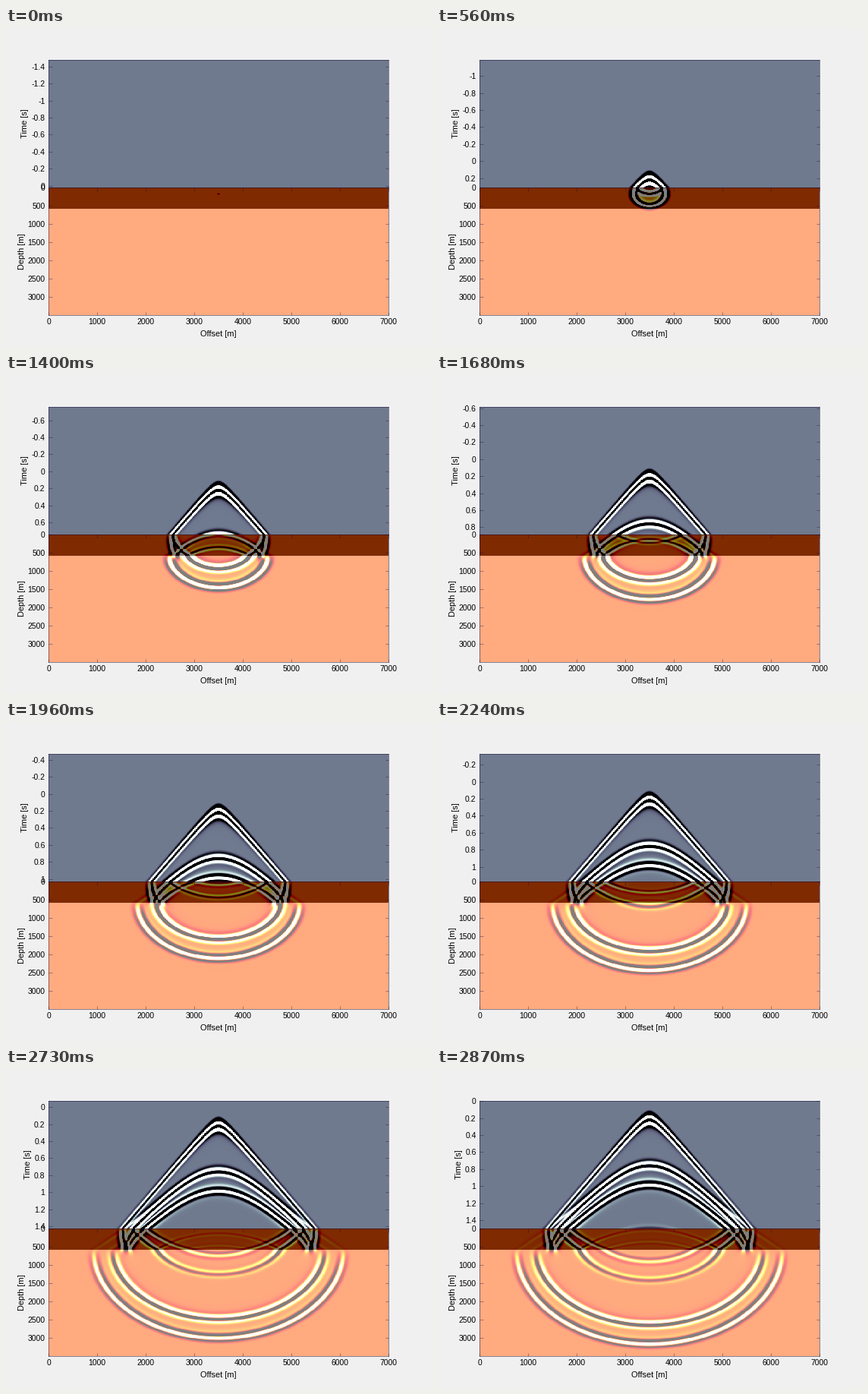
Animation, 560 px wide and 420 px high, one loop 2.94 s. Source, as a matplotlib script:

```python
import numpy as np
import matplotlib.pyplot as plt
from matplotlib.animation import FuncAnimation

plt.rcParams["font.family"] = "Liberation Sans"

# Acoustic model: a slow layer over a faster half space, free surface on top
H, DT = 10.0, 0.002
NX, NZ, NT = 700, 350, 750
FRAMES, FIRST, STRIDE = 42, 11, 18
SRC_Z, REC_Z, LAYER = 17, 2, 58
FREQ, DELAY = 10.0, 0.1
PX = 0.72  # one pixel in points


def source(t):
    """Time derivative of a Ricker wavelet."""
    a = (np.pi * FREQ) ** 2
    s = t - DELAY
    return (4 * a * a * s ** 3 - 6 * a * s) * np.exp(-a * s * s)


def simulate():
    speed = np.full((NZ, 1), 1500.0)
    speed[LAYER:] = 2270.0
    k = ((speed * DT / H) ** 2 / 12).astype(np.float32)
    # Two ghost cells on every side; row 2 is the surface
    p = np.zeros((NZ + 4, NX + 5), np.float32)
    old = np.zeros_like(p)
    mid = NX // 2 + 2
    snaps, trace = [], np.zeros((NT, NX + 1), np.float32)
    for n in range(NT):
        c = p[2:-2, 2:-2]
        lap = 16 * (p[1:-3, 2:-2] + p[3:-1, 2:-2] + p[2:-2, 1:-3] + p[2:-2, 3:-1])
        lap -= p[:-4, 2:-2] + p[4:, 2:-2] + p[2:-2, :-4] + p[2:-2, 4:]
        lap -= 60 * c
        old[2:-2, 2:-2] = 2 * c - old[2:-2, 2:-2] + k * lap
        p, old = old, p
        p[2 + SRC_Z, mid] += source(n * DT) * DT
        p[2] = 0
        p[1], p[0] = -p[3], -p[4]
        trace[n] = p[2 + REC_Z, 2:-2]
        if n % STRIDE == FIRST:
            snaps.append(p[2:-2, 2:-2].copy())
    return snaps, trace


def hot(v):
    return np.stack([np.clip(v / 0.375, 0, 1),
                     np.clip((v - 0.375) / 0.375, 0, 1),
                     np.clip((v - 0.75) / 0.25, 0, 1)], axis=-1)


def bone(v):
    return (7 * v[..., None] + hot(v)[..., ::-1]) / 8


def level(a, clip):
    return np.clip(0.5 + 0.5 * a / clip, 0, 1)


snaps, trace = simulate()
wave_clip = 0.3 * np.abs(snaps[32][100:]).max()
trace_clip = 0.2 * np.abs(trace[330:430, NX // 2]).max()

rock = np.zeros((NZ, 1, 1))
rock[LAYER:] = 1


def section(i):
    return 0.5 * rock + 0.5 * hot(level(snaps[i], wave_clip))


gather = bone(level(np.vstack([np.zeros_like(trace), trace]), trace_clip))

fig = plt.figure(figsize=(5.6, 4.2), dpi=100, facecolor="#f0f0f0")
top = fig.add_axes([0.1, 0.5, 0.8, 0.4])
low = fig.add_axes([0.1, 0.1, 0.8, 0.4])
INK = (0.08, 0.04, 0.2, 0.6)
for ax in (top, low):
    ax.tick_params(direction="in", length=4.5 * PX, width=0.6 * PX, color=INK,
                   right=True, labelsize=10.4 * PX, pad=4.5 * PX)
    for s in ax.spines.values():
        s.set(color=INK, linewidth=0.8 * PX)
top.set_xticks([])
low.tick_params(top=True)

top.imshow(gather, extent=(0, 7000, NT * DT, -NT * DT), aspect="auto",
           interpolation="nearest")
view = low.imshow(section(0), extent=(0, 7000, 3500, 0), aspect="auto",
                  interpolation="nearest")
low.set_xticks(range(0, 7001, 1000))
low.set_yticks(range(0, 3001, 500))


def label(x, y, text, turn=0):
    return fig.text(x / 560, 1 - y / 420, text, fontsize=11 * PX, rotation=turn,
                    ha="center", va="center")


label(280, 402.5, "Offset [m]")
label(20.5, 294, "Depth [m]", 90)
time_label = label(25.5, 126, "Time [s]", 90)


def draw(i):
    t = (FIRST + STRIDE * i) * DT
    marks = [m / 5 for m in range(-7, 8) if t - 1.5 - 0.003 <= m / 5 <= t]
    top.set_yticks(marks, [f"{m:g}" for m in marks])
    top.set_ylim(t, t - 1.5)
    time_label.set_x((25.5 if marks[0] < 0 else 29.5) / 560)
    view.set_data(section(i))
    return view, time_label


anim = FuncAnimation(fig, draw, frames=FRAMES, interval=70, repeat=True,
                     repeat_delay=0, blit=False)
plt.show()
```
